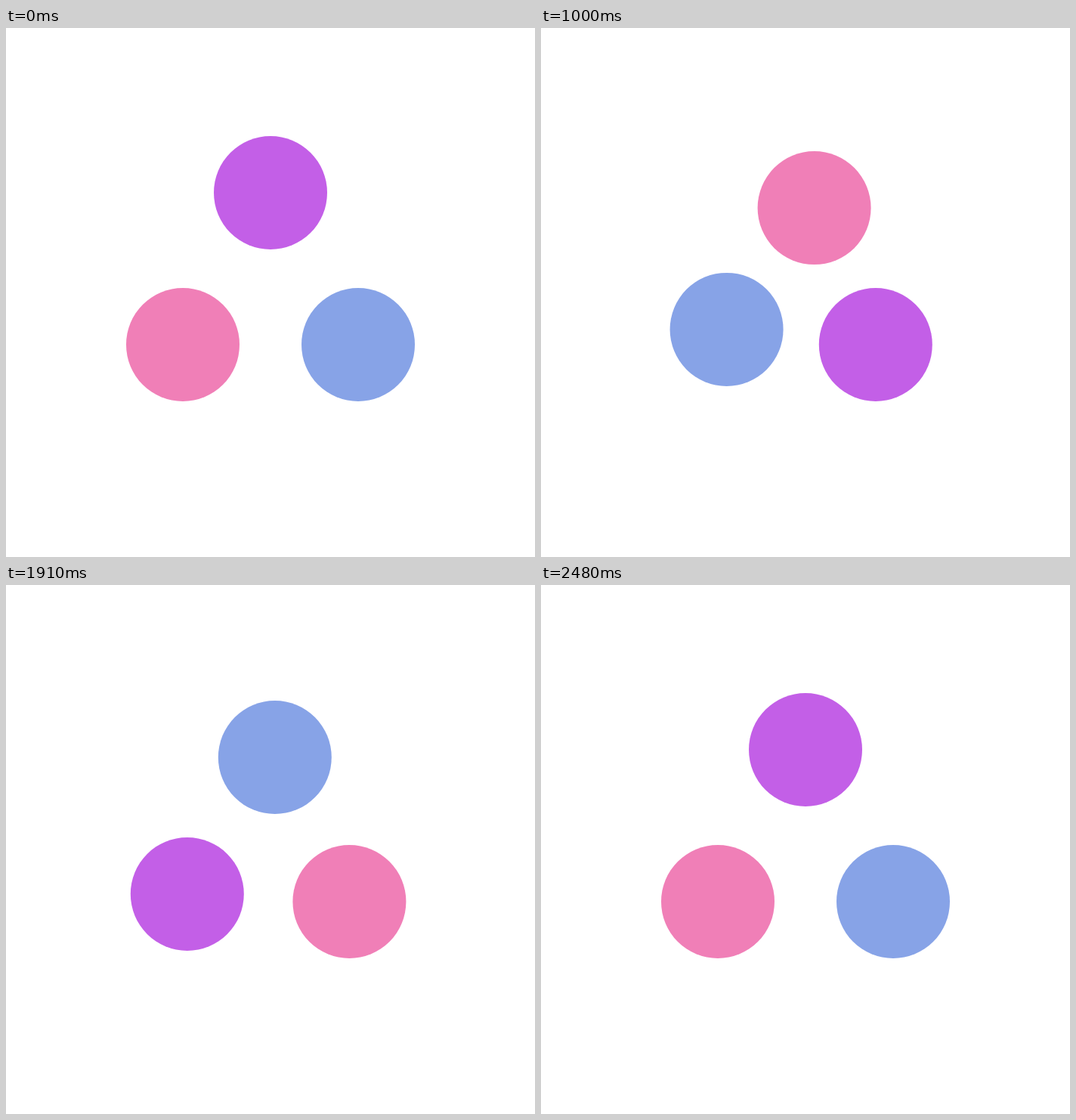
An HTML page with a canvas for the animation above (2810 ms loop, 700x700 px).

```html
<!DOCTYPE html>
<html lang="en">
<head>
<meta charset="utf-8">
<title>Rotating circles</title>
<style>
  html, body { margin: 0; height: 100%; overflow: hidden; background: #fff; }
  canvas { display: block; }
</style>
</head>
<body>
<canvas width="700" height="700"></canvas>
<script>
const ctx = document.querySelector('canvas').getContext('2d');
const LOOP = 2810, TURN = 940, STEP = 30, STEPS = 20, RADIUS = 75;
const corners = [[350, 218], [466, 419], [234, 419]]; // top, right, left

// Painted in this order; start is the corner held at time zero.
const circles = [
  { color: '#b538e2', start: 0 },
  { color: '#698de2', start: 1 },
  { color: '#ed5fa5', start: 2 },
];

function draw(now) {
  const time = now % LOOP;
  const turn = Math.floor(time / TURN);
  const progress = Math.min(Math.floor((time % TURN) / STEP), STEPS) / STEPS;

  ctx.clearRect(0, 0, 700, 700);
  ctx.globalAlpha = 0.8;
  for (const { color, start } of circles) {
    const [x0, y0] = corners[(start + turn) % 3];
    const [x1, y1] = corners[(start + turn + 1) % 3];
    ctx.fillStyle = color;
    ctx.beginPath();
    ctx.arc(x0 + (x1 - x0) * progress, y0 + (y1 - y0) * progress, RADIUS, 0, 2 * Math.PI);
    ctx.fill();
  }
}

let origin;
function frame() {
  const now = performance.now();
  origin ??= now;
  draw(now - origin);
  requestAnimationFrame(frame);
}
frame();
</script>
</body>
</html>
```
